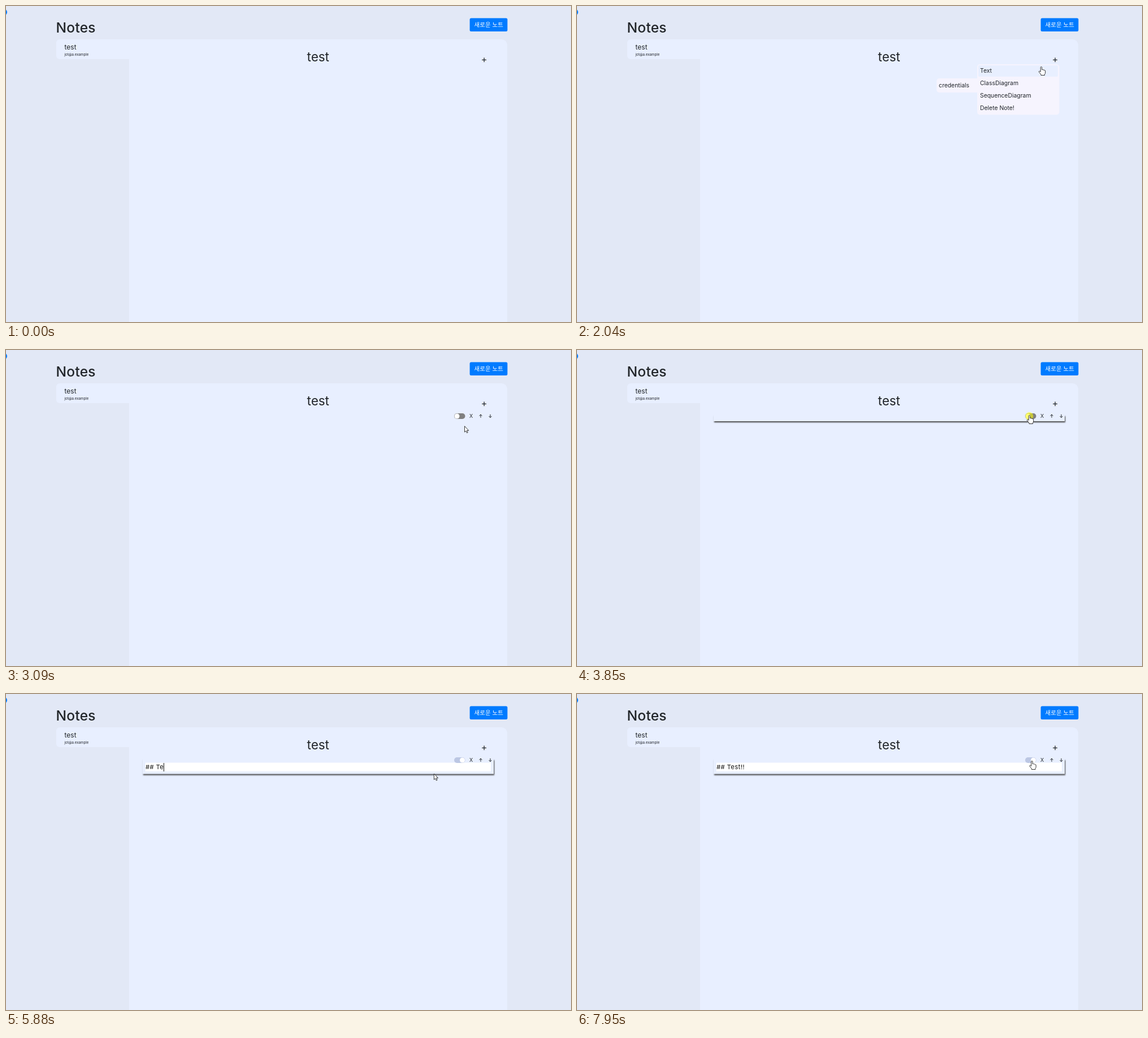
These frames come from a looping animation (1001x559 px, 8 s). An HTML page:

```html
<!DOCTYPE html>
<html lang="ko">
<head>
<meta charset="utf-8">
<title>Notes</title>
<style>
html, body { margin: 0; width: 100%; height: 100%; overflow: hidden; background: #e2e8f6; }
svg { display: block; font-family: Inter, sans-serif; fill: #212529; }
.panel { fill: #e8efff; }
.menu { fill: #f6f4fe; }
.items { font-size: 10.4px; }
.line { fill: none; stroke: #212529; stroke-linecap: round; }
.shadow { filter: drop-shadow(1px 2.5px 1.1px #444); }
.pointer path { stroke: #222; stroke-width: .9; stroke-linejoin: round; fill: #fff; }
</style>
</head>
<body>
<svg width="1001" height="559" viewBox="0 0 1001 559">
  <circle cx="-4" cy="11" r="6" fill="#007bff"/>
  <text x="88.5" y="47" font-size="24.7" font-weight="500" letter-spacing=".15">Notes</text>
  <path class="panel" d="M218 59V94H95a6 6 0 0 1-6-6V65a6 6 0 0 1 6-6Z"/>
  <path class="panel" d="M218 559V59H878a10 10 0 0 1 10 10V559Z"/>
  <text x="103.5" y="76.5" font-size="12">test</text>
  <text x="103.5" y="88" font-size="6.15">jot@a.example</text>
  <rect x="821.6" y="21.6" width="66.8" height="23.3" rx="2.5" fill="#007bff"/>
  <text x="855.2" y="36.6" font-size="10.5" text-anchor="middle" fill="#fff" style="font-family:'Noto Sans CJK KR','Noto Sans CJK',sans-serif">새로운 노트</text>
  <text x="553" y="98" font-size="22.4" text-anchor="middle">test</text>
  <path class="line" stroke-width="1.3" d="M843.7 95.3h6.8M847.1 91.9v6.8"/>

  <g id="note">
    <rect id="card" class="panel" x="242" y="115" width="622"/>
    <rect id="area" x="247" y="121.5" width="612" fill="#fff"/>
    <text id="typed" x="247.3" y="133" font-size="11" letter-spacing=".5" xml:space="preserve" fill="#111"></text>
    <rect id="caret" y="122" width="1" height="15" fill="#111"/>
    <rect id="track" x="794" y="112" width="19.5" height="10" rx="5"/>
    <circle id="knob" cy="117" r="4.5" fill="#fff"/>
    <text x="824" y="120.3" font-size="9" text-anchor="middle">X</text>
    <path class="line" d="M841 119.3v-5M838.8 116.3l2.2-2.2 2.2 2.2M858 114.3v5M855.8 117.3l2.2 2.2 2.2-2.2"/>
  </g>

  <g id="submenu" class="items">
    <rect class="menu" x="637" y="128" width="76" height="25" rx="5"/>
    <text x="641" y="143.7">credentials</text>
  </g>
  <g id="menu" class="items">
    <rect class="menu" x="709" y="103" width="145.5" height="89.5" rx="5"/>
    <rect id="active" class="panel" x="711" y="105" width="141" height="20" rx="2"/>
    <text x="714" y="118.3">Text</text>
    <text x="714" y="140.2">ClassDiagram</text>
    <text x="714" y="162">SequenceDiagram</text>
    <text x="714" y="183.9">Delete Note!</text>
  </g>

  <circle id="click" r="7" fill="#ff0" fill-opacity=".55"/>
  <g id="pointer" class="pointer">
    <path id="arrow" d="M0 0V10.5L2.4 8.4 4 12 5.7 11.2 4.1 7.7H7.2Z"/>
    <path id="hand" d="M-1.2 9V1.2Q-1.2 0 0 0T1.2 1.2V5.2Q2.4 4.4 3.4 5.6 4.8 5 5.5 6.2 7.2 6 7.2 7.6V10.5Q7.2 12.3 6 13.3V15H-.5V13.6L-4 9.3Q-4.6 8-3.4 7.6-2.4 7.5-1.2 9Z"/>
    <path id="beam" d="M-2.3-4.7H-.6L0-4.2.6-4.7H2.3M0-4.2V4.2M-2.3 4.7H-.6L0 4.2.6 4.7H2.3" style="fill:none"/>
  </g>
</svg>
<script>
const $ = id => document.getElementById(id);
const set = (id, attrs) => { for (const k in attrs) $(id).setAttribute(k, attrs[k]); };
const show = (id, on) => { $(id).style.display = on ? "" : "none"; };
const ramp = (t, a, b) => Math.min(1, Math.max(0, (t - a) / (b - a)));
const within = (t, a, b) => t >= a && t < b;

// time, x, y of the pointer tip
const path = [
  [190, 1006, 476], [850, 840, 88], [970, 847, 90], [1440, 847, 90],
  [1710, 822.5, 107.5], [2250, 822.5, 107.5], [2600, 848, 88], [2740, 848, 91],
  [3090, 812.5, 134.7], [3230, 812, 152], [3580, 801.5, 115.5], [3990, 801.5, 115.5],
  [4340, 758.3, 141], [7540, 758.3, 141], [7900, 806, 118.5]
];
const keys = [[4930, "#"], [5200, "#"], [5400, " "], [5660, "T"], [5880, "e"],
  [6280, "s"], [6410, "t"], [6680, "!"], [6810, "!"]];
const clicks = [[2110, 2250], [3780, 3920]];

function tip(t) {
  const i = path.findIndex(p => p[0] > t);
  if (i < 0) return path[path.length - 1].slice(1);
  if (i === 0) return path[0].slice(1);
  const [ta, xa, ya] = path[i - 1], [tb, xb, yb] = path[i];
  const u = ramp(t, ta, tb), e = u * u * (3 - 2 * u);
  return [xa + (xb - xa) * e, ya + (yb - ya) * e];
}

function draw(t) {
  const [x, y] = tip(t);
  const over = (l, top, r, b) => x >= l && x <= r && y >= top && y <= b;
  const menuOpen = within(t, 1030, 2600), noteOn = t >= 2180, editing = t >= 3920;

  show("menu", menuOpen);
  $("menu").style.opacity = ramp(t, 960, 1170);
  show("active", over(711, 104, 852, 125));
  show("submenu", within(t, 1970, 2250));

  show("note", noteOn);
  const cardH = !editing ? 11 : t < 5000 ? 43 : 26.5;
  const areaH = t < 5000 ? 32 : 15.5;
  set("card", { height: cardH });
  $("card").classList.toggle("shadow", over(242, 111, 864, 117 + cardH));
  show("area", editing);
  set("area", { height: areaH });

  const slide = ramp(t, 3920, 4060);
  set("knob", { cx: 799 + 9.5 * slide });
  set("track", { fill: slide < .5 ? "#808080" : "#bcc7e4" });

  const text = keys.filter(k => t >= k[0]).map(k => k[1]).join("");
  $("typed").textContent = text;
  show("caret", within(t, 4270, 4800) || within(t, 4930, 7340) || within(t, 7870, 7950));
  if (noteOn) set("caret", { x: 247 + (text ? $("typed").getComputedTextLength() : 0) });

  show("click", clicks.some(c => within(t, ...c)));
  set("click", { cx: x, cy: y + 1.5 });

  const onControl = noteOn && over(794, 111, 862, 123);
  const hand = over(838, 84, 857, 104) || (menuOpen && over(709, 103, 854, 192)) || onControl;
  const beam = !hand && editing && over(247, 121, 859, 121.5 + areaH);
  show("pointer", t >= 190);
  show("hand", hand);
  show("beam", beam);
  show("arrow", !hand && !beam);
  set("pointer", { transform: `translate(${x} ${y})` });
}

const start = performance.now();
function tick() {
  draw((performance.now() - start) % 8000);
  requestAnimationFrame(tick);
}
tick();
</script>
</body>
</html>
```
